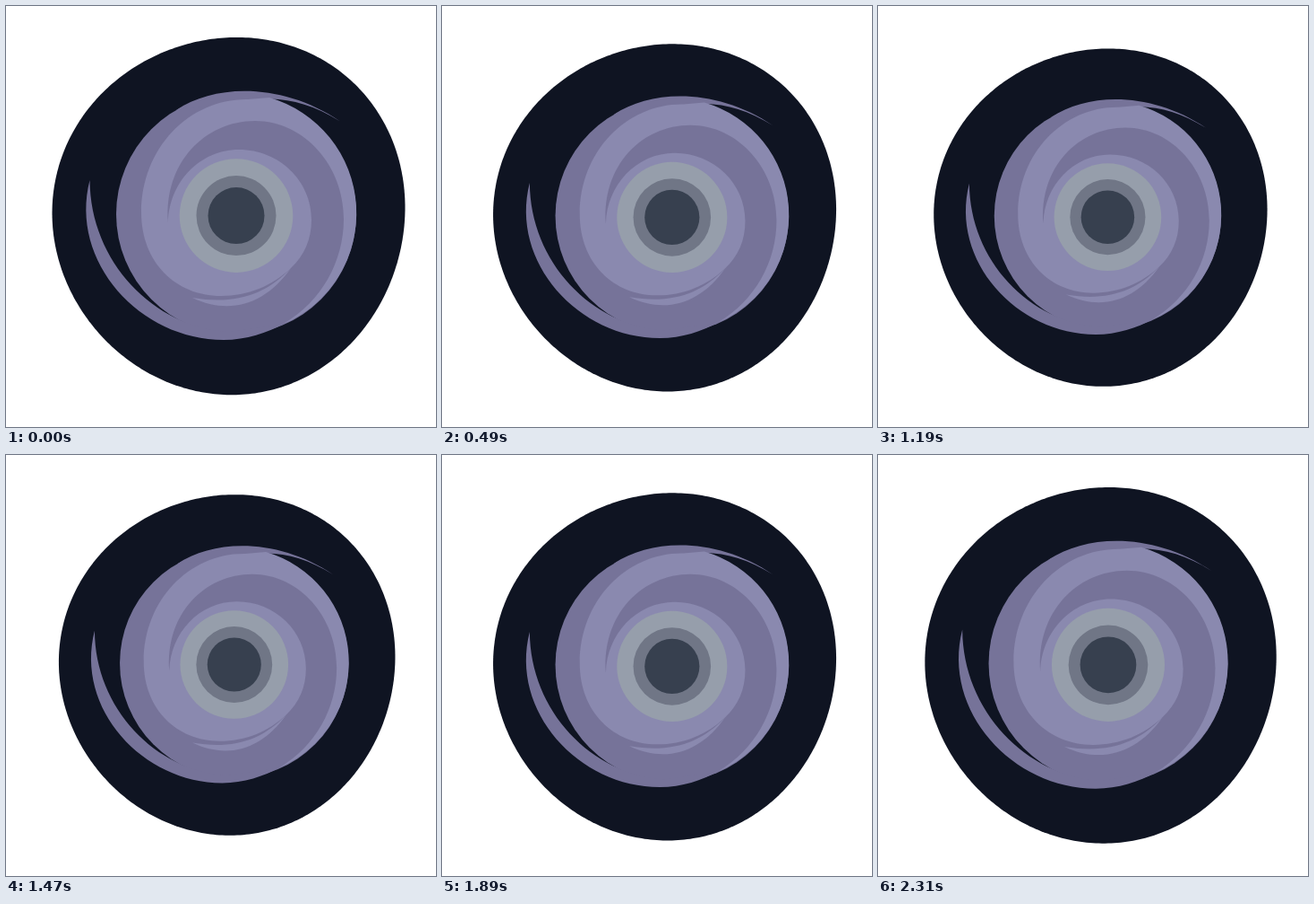
Write an HTML page with a canvas that moves like this. It is 480 px wide and 469 px high and loops after 2380 ms.

```html
<!DOCTYPE html>
<html lang="en">
<head>
<meta charset="utf-8">
<title>Pulsing swirl</title>
<style>
html, body { margin: 0; width: 100%; height: 100%; overflow: hidden; background: #fff; }
canvas { display: block; }
</style>
</head>
<body>
<canvas id="stage" width="480" height="469"></canvas>
<script>
const ctx = document.getElementById('stage').getContext('2d');
const STEP = 70, STEPS = 34, HALF = STEPS / 2;
const CX = 250, CY = 233.3;
const NAVY = '#0f1422', DARK = '#767399', LIGHT = '#8a89af';

function circle(x, y, r) {
  const path = new Path2D();
  path.arc(x, y, r, 0, Math.PI * 2);
  return path;
}

// Almost round edge: a circle with a slow two- and threefold wobble.
function wobblyDisc() {
  const path = new Path2D();
  for (let a = 0; a < Math.PI * 2; a += Math.PI / 180) {
    const r = 198 + 2.2 * Math.cos(3 * (a - .785)) + 1.7 * Math.cos(2 * (a - 1.13));
    path.lineTo(CX + r * Math.cos(a), CY - .7 - r * Math.sin(a));
  }
  path.closePath();
  return path;
}

const leftTail = new Path2D(`M93.5 194 C70 285 150 372 243 372
  C268 372 292 364 310 354 L248 363 C165 358 94 285 93.5 194Z`);

const topTail = new Path2D(`M190 116 C235 86 310 86 373 128.5
  C345 111 320 104 295 103.5Z`);

const band = new Path2D(`M294 102 A134 134 0 0 1 310 354
  C352 329 377 285 377 237 C377 178 333 128 278 128
  C222 128 176 175 181 241 C182 197 216 160 260 160
  C305 160 341 195 341 238 C341 260 333 278 318 292
  C297 312 270 323 240 323 C190 323 151 286 151 230
  C151 158 205 103 270 104Z`);

const sliver = new Path2D('M208 325 C250 345 290 332 318 292 C290 322 255 333 208 325Z');

const layers = [
  [wobblyDisc(), NAVY],
  [circle(257, 232, 134), DARK],
  [leftTail, DARK],
  [topTail, DARK],
  [band, LIGHT],
  [sliver, LIGHT],
  [circle(257, 233.6, 63.3), '#969eab'],
  [circle(257, 233.6, 44.5), '#707686'],
  [circle(257, 233.6, 31.5), '#37404f']
];

function draw(now) {
  const step = Math.floor(now / STEP) % STEPS;
  const k = Math.min(step, STEPS - step);
  const scale = 1 - .055 * Math.sin(1.2 * k / HALF) / Math.sin(1.2);
  const sink = 1.8 * Math.min(1, k / 7);
  const nudge = 1.9 * Math.max(0, 1 - Math.abs(k - 13) / 4.5);

  ctx.setTransform(1, 0, 0, 1, 0, 0);
  ctx.fillStyle = '#fff';
  ctx.fillRect(0, 0, 480, 469);
  ctx.translate(CX - nudge, CY + sink - nudge);
  ctx.scale(scale, scale);
  ctx.translate(-CX, -CY);

  for (const [path, color] of layers) {
    ctx.fillStyle = color;
    ctx.fill(path);
  }
}

const start = performance.now();
function tick() {
  draw(performance.now() - start);
  requestAnimationFrame(tick);
}
tick();
</script>
</body>
</html>
```
